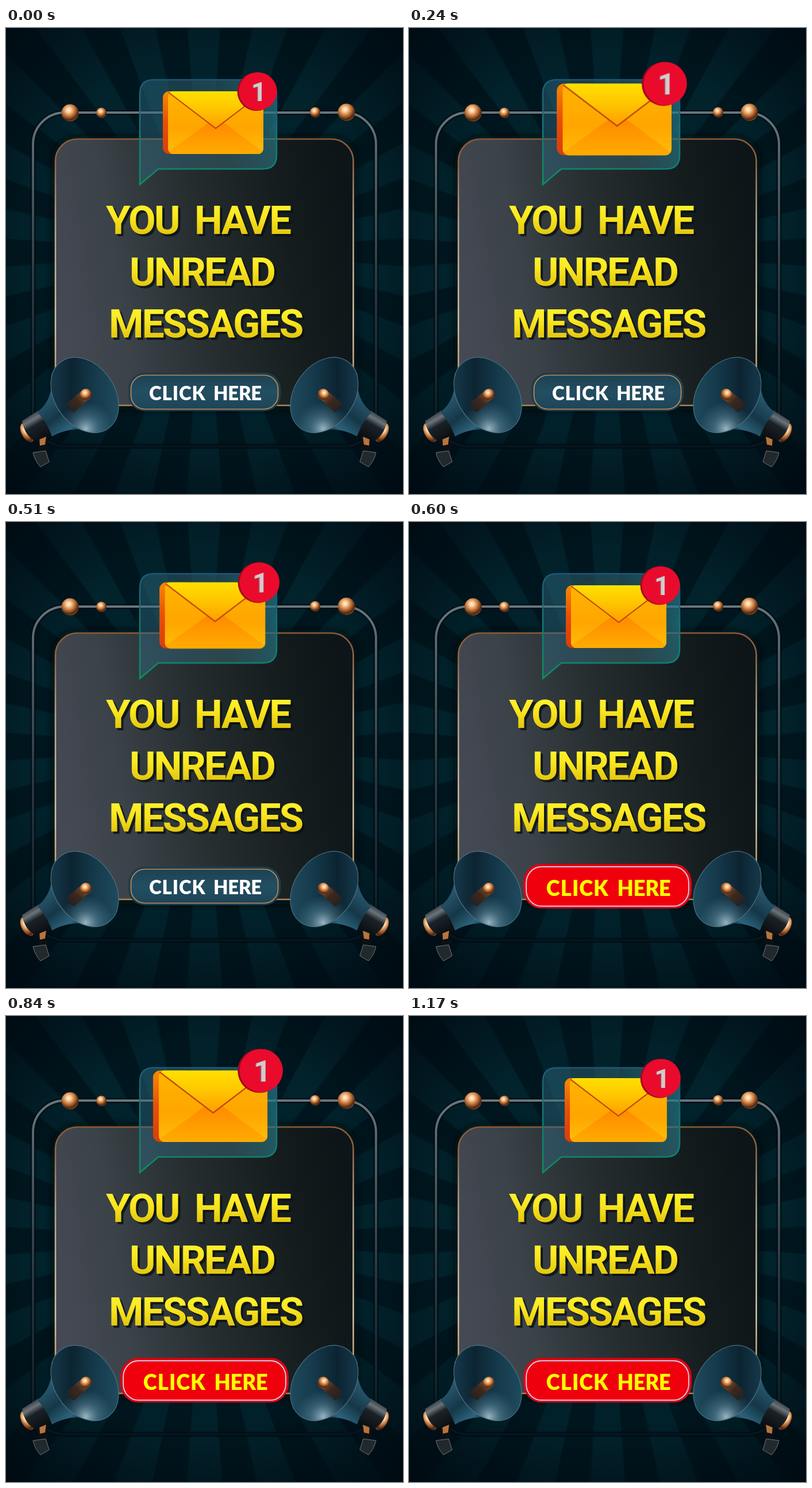
Write an HTML page that moves like this. It is 691 px wide and 810 px high and loops after 1.2 s.

```html
<!DOCTYPE html>
<html lang="en">
<head>
<meta charset="utf-8">
<title>Unread messages</title>
<style>
html, body { margin: 0; width: 100%; height: 100%; overflow: hidden; background: #000d14; }
.stage { position: relative; width: 691px; height: 810px; overflow: hidden; }
.rays, .shade, svg { position: absolute; inset: 0; }
.rays {
  --step: calc(360deg / 22);
  background: repeating-conic-gradient(from calc(var(--step) / -4) at 345px 390px,
    #02252e 0 calc(var(--step) * .48), #00171f calc(var(--step) * .52) calc(var(--step) * .98), #02252e var(--step));
}
.shade {
  background:
    radial-gradient(ellipse 460px 560px at 345px 390px, transparent 62%, #000a12c8 100%),
    linear-gradient(#000a1230, transparent 25% 80%, #000a1250);
}
.title { font: 700 69px Roboto, sans-serif; letter-spacing: -2.7px; }
.label { font: 900 33px Lato, sans-serif; }
.mail { animation: pulse 1.2s steps(10) infinite; }
.blue { --face: url(#blueFace); --rim: #1d3d4d; --line: #c08a55; --ink: #fff; animation: first 1.2s step-end infinite; }
.red { --face: #f0000c; --rim: #dc000c; --line: #d6cdf0; --ink: #ffff00; animation: second 1.2s step-end infinite; }
@keyframes pulse {
  0%, 50%, 100% { transform: translate(0, 0) scale(1); }
  25% { transform: translate(-68.1px, -36.1px) scale(1.177); }
  75% { transform: translate(-69.1px, -38.1px) scale(1.174); }
}
@keyframes first { 0% { visibility: visible; } 50%, 100% { visibility: hidden; } }
@keyframes second { 0% { visibility: hidden; } 50%, 100% { visibility: visible; } }
</style>
</head>
<body>
<div class="stage">
<div class="rays"></div>
<div class="shade"></div>
<svg width="691" height="810" viewBox="0 0 691 810">
  <defs>
    <linearGradient id="rail" x2="0" y2="1">
      <stop stop-color="#69767b"/><stop offset=".12" stop-color="#56636a"/>
      <stop offset=".5" stop-color="#2b3a42"/><stop offset=".85" stop-color="#13232b"/><stop offset="1" stop-color="#06151d"/>
    </linearGradient>
    <linearGradient id="panel" x1="0" y1=".6" x2="1" y2=".45">
      <stop stop-color="#454954"/><stop offset=".22" stop-color="#3b4248"/>
      <stop offset=".5" stop-color="#262d2f"/><stop offset=".8" stop-color="#151c1e"/><stop offset="1" stop-color="#0e1518"/>
    </linearGradient>
    <linearGradient id="edge" x2="0" y2="1">
      <stop stop-color="#8a5a38"/><stop offset=".1" stop-color="#94684a"/><stop offset=".3" stop-color="#b3a08e"/>
      <stop offset=".7" stop-color="#d2c2a6"/><stop offset="1" stop-color="#b08450"/>
    </linearGradient>
    <radialGradient id="copper" cx=".42" cy=".34" r=".68">
      <stop stop-color="#fff6e6"/><stop offset=".2" stop-color="#ffce9a"/>
      <stop offset=".5" stop-color="#c67a40"/><stop offset=".85" stop-color="#50230c"/><stop offset="1" stop-color="#8a5230"/>
    </radialGradient>
    <linearGradient id="glass" x1="0" y1=".2" x2="1" y2="0">
      <stop stop-color="#2f6c84" stop-opacity=".45"/><stop offset=".5" stop-color="#3c6c78" stop-opacity=".45"/>
      <stop offset="1" stop-color="#217a88" stop-opacity=".75"/>
    </linearGradient>
    <linearGradient id="glassEdge" x1=".2" x2="0" y2="1">
      <stop stop-color="#1d5679"/><stop offset=".4" stop-color="#187577"/><stop offset="1" stop-color="#099064"/>
    </linearGradient>
    <linearGradient id="gold" gradientUnits="userSpaceOnUse" x1="0" y1="305" x2="0" y2="395" spreadMethod="repeat">
      <stop stop-color="#fff230"/><stop offset=".25" stop-color="#fbe71f"/>
      <stop offset=".6" stop-color="#e2c60e"/><stop offset="1" stop-color="#e2c60e"/>
    </linearGradient>
    <linearGradient id="blueFace" x2="0" y2="1">
      <stop stop-color="#1d4253"/><stop offset=".5" stop-color="#234e62"/><stop offset="1" stop-color="#1d4558"/>
    </linearGradient>
    <linearGradient id="side" x2="0" y2="1"><stop stop-color="#f78a00"/><stop offset=".5" stop-color="#e84e08"/><stop offset="1" stop-color="#d93d0c"/></linearGradient>
    <linearGradient id="front" x2="0" y2="1"><stop stop-color="#ffb400"/><stop offset=".6" stop-color="#ffa600"/><stop offset="1" stop-color="#ffbd08"/></linearGradient>
    <linearGradient id="flap" x2="0" y2="1"><stop stop-color="#ffe000"/><stop offset=".5" stop-color="#ffc400"/><stop offset="1" stop-color="#ff9c00"/></linearGradient>
    <linearGradient id="fold" x2="0" y2="1"><stop stop-color="#ff8a00"/><stop offset="1" stop-color="#ffac00"/></linearGradient>
    <linearGradient id="bell" x1=".1" y1=".8" x2=".8" y2=".1">
      <stop stop-color="#16384a"/><stop offset=".3" stop-color="#0c2432"/><stop offset=".65" stop-color="#153a4b"/><stop offset="1" stop-color="#1f4a5d"/>
    </linearGradient>
    <radialGradient id="glow" gradientUnits="userSpaceOnUse" cx="186" cy="670" r="48">
      <stop stop-color="#a9c3cf" stop-opacity=".9"/><stop offset=".45" stop-color="#5f8ca0" stop-opacity=".5"/><stop offset="1" stop-color="#49788e" stop-opacity="0"/>
    </radialGradient>
    <linearGradient id="cone" x1=".1" y1=".4" x2=".6" y2="1">
      <stop stop-color="#2a5a70"/><stop offset=".45" stop-color="#153747"/><stop offset=".8" stop-color="#2d647d"/><stop offset="1" stop-color="#0d2836"/>
    </linearGradient>
    <linearGradient id="rod" x1="0" y1="1" x2="1" y2="0">
      <stop stop-color="#1a2024"/><stop offset=".5" stop-color="#3d281e"/><stop offset="1" stop-color="#a0653a"/>
    </linearGradient>
    <linearGradient id="collar" x1=".2" y1="0" x2=".8" y2="1">
      <stop stop-color="#11191e"/><stop offset=".28" stop-color="#6b747a"/><stop offset=".45" stop-color="#1b2227"/><stop offset="1" stop-color="#05090c"/>
    </linearGradient>
    <filter id="soft" x="-20%" y="-20%" width="140%" height="140%"><feGaussianBlur stdDeviation="6"/></filter>

    <g id="button">
      <rect x="213" y="599" width="265" height="67" rx="28" fill="var(--rim)"/>
      <rect x="217.5" y="603.5" width="256" height="59" rx="24" fill="var(--face)" stroke="var(--line)" stroke-width="1.7"/>
      <g class="label" fill="var(--ink)">
        <text x="249" y="646.8" letter-spacing=".9">CLICK</text>
        <text x="361" y="646.8" letter-spacing="-.3">HERE</text>
      </g>
    </g>

    <ellipse id="mouth" cx="137" cy="638" rx="71" ry="52" transform="rotate(55 137 638)"/>

    <g id="horn">
      <path d="M54 708 L75 705 Q70 725 75 754 L60 763 Q50 752 47 738 L56 732 Z" fill="#0b1013"/>
      <path d="M47 738 L69 735 L75 754 L60 763 Q50 752 47 738Z" fill="#22292d" stroke="#6c757a"/>
      <path d="M58 711 L70 709 L68 724 L59 726Z" fill="#b8743e"/>
      <ellipse cx="37" cy="703" rx="10" ry="18" transform="rotate(-28 37 703)" fill="url(#copper)"/>
      <path d="M28 683 L56 665 Q75 678 83 705 L51 718 Q32 708 28 683Z" fill="url(#collar)"/>
      <path d="M79 600 Q84 646 54 668 Q70 682 80 710 Q115 689 168 703 Z" fill="url(#cone)"/>
      <use href="#mouth" fill="url(#bell)"/>
      <use href="#mouth" fill="url(#glow)"/>
      <path d="M105 653 L134 629 L145 644 L119 668 Q108 664 105 653Z" fill="url(#rod)"/>
      <circle cx="139" cy="637" r="10" fill="url(#copper)"/>
      <use href="#mouth" fill="none" stroke="#4a7284" stroke-width="1.2"/>
    </g>

    <g id="words" class="title">
      <text x="174" y="358">YOU</text><text x="328" y="358">HAVE</text>
      <text x="215" y="448">UNREAD</text><text x="179" y="538">MESSAGES</text>
    </g>
  </defs>

  <rect x="47" y="147" width="597" height="580" rx="55" fill="#00101820" stroke="#000b12" stroke-width="9" opacity=".7"/>
  <rect x="47" y="147" width="597" height="580" rx="55" fill="none" stroke="url(#rail)" stroke-width="4"/>
  <rect x="80" y="188" width="532" height="476" rx="42" fill="#000a10" opacity=".75" filter="url(#soft)"/>
  <rect x="86" y="193" width="518.5" height="463" rx="38" fill="url(#panel)" stroke="url(#edge)" stroke-width="2.6"/>
  <g fill="url(#copper)">
    <circle cx="111.5" cy="147.5" r="15"/><circle cx="166" cy="147.5" r="9"/>
    <circle cx="538" cy="146.5" r="9"/><circle cx="592.5" cy="146.5" r="15"/>
  </g>

  <path d="M233 272 V114 Q233 90 257 90 H447 Q471 90 471 114 V221 Q471 245 447 245 H265 Z"
    fill="url(#glass)" stroke="url(#glassEdge)" stroke-width="2.5"/>

  <g class="mail">
    <rect x="273" y="110" width="60" height="109" rx="11" fill="url(#side)"/>
    <rect x="282" y="110" width="166" height="109" rx="9" fill="url(#front)"/>
    <path d="M284 214 L352 165 H380 L446 214 Q444 219 439 219 H291 Q286 219 284 214Z" fill="url(#fold)"/>
    <path d="M283 113 L288 110 H442 L447 113 L365 174.5 Z" fill="url(#flap)"/>
    <path d="M283 112 L365 174.5 L447 112" fill="none" stroke="#bd4608" stroke-width="2"/>
    <circle cx="436" cy="110.5" r="33.5" fill="#a4081d"/>
    <circle cx="438.5" cy="110" r="33" fill="#ea0b2c"/>
    <g font-family="Roboto, sans-serif" font-weight="700" font-size="46">
      <text x="425.5" y="127" fill="#9c5560">1</text>
      <text x="427" y="126.5" fill="#d2cacb">1</text>
    </g>
  </g>

  <use href="#words" fill="#0b1113" opacity=".8" transform="translate(4 4)"/>
  <use href="#words" fill="url(#gold)"/>

  <use href="#button" class="blue"/>
  <use href="#button" class="red" transform="translate(345.5 633) scale(1.105 1.16) translate(-345.5 -632.5)"/>
  <use href="#horn"/>
  <use href="#horn" transform="translate(691 0) scale(-1 1)"/>
</svg>
</div>
</body>
</html>
```
